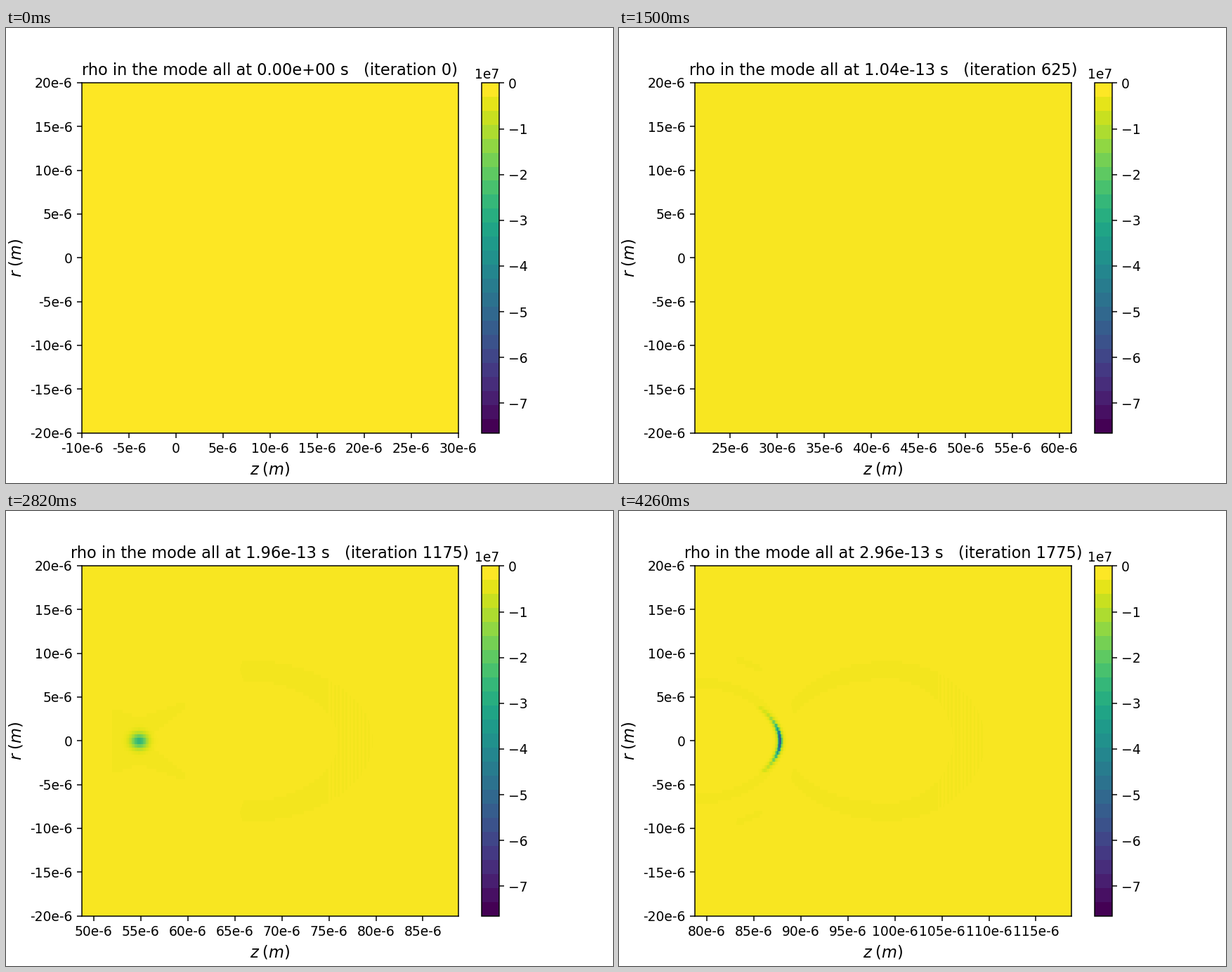
These frames come from a looping animation (864 px wide and 648 px high, 4320 ms). A matplotlib script:

```python
import numpy as np
import matplotlib.pyplot as plt
from matplotlib.animation import FuncAnimation
from matplotlib.cm import ScalarMappable
from matplotlib.colors import Normalize
from matplotlib.ticker import FuncFormatter, MultipleLocator

FRAMES, INTERVAL = 72, 60
STEP = 25                    # iterations per frame
DZ = 0.05                    # window shift per iteration, microns
DT = DZ * 1e-6 / 299792458
VMIN, VMAX = -7.65e7, 0.01e7
ENTRY = 620                  # the laser reaches the plasma
PLASMA, SHEATH = -0.07, -0.12   # units of 1e7

X, R = np.meshgrid(np.arange(0.05, 40, 0.1), np.arange(-19.8, 20, 0.4))
A = np.abs(R)


def inside(xc, left, right, b):
    """Ellipse with different half-lengths on its two sides."""
    a = np.where(X < xc, left, right)
    return ((X - xc) / a) ** 2 + (R / b) ** 2 < 1


def keyed(it, times, values):
    return np.interp(it, times, values)


def wake(it, pinch):
    """Sheath of the leading bubble, striped by the laser at its head."""
    keys = (825, 1175, 1525)
    xc = keyed(it, keys, (20.3, 17.0, 20.5))
    tip = keyed(it, keys, (29.8, 30.9, 30.8))
    tail = keyed(it, (ENTRY, 825, 1175, 1350, 1525), (30, 20.2, 16.8, 12.5, 9))
    half = max(xc - pinch, 1)
    outer = inside(xc, half + 0.4, tip - xc, keyed(it, keys, (8.9, 9.3, 9.1)))
    inner = inside(xc, half - 0.4, keyed(it, keys, (7.5, 10.2, 6.9)),
                   keyed(it, keys, (7.6, 7.0, 7.1)))
    period = 0.8 if it < 1000 else 0.4
    head = keyed(it, keys, (25, 26, 25.6))
    stripes = (X < head) | (np.cos(2 * np.pi * (X - 25.3) / period) > 0.1)
    cut = X > tail + 0.3 * np.abs(A - 8.2)
    return outer & ~inner & stripes & cut


def star(it, pinch):
    """Faint crossing of trajectories behind the first bubble."""
    if not 1060 < it < 1375:
        return np.zeros(X.shape, bool)
    s = keyed(it, (1050, 1175), (0.3, 1))
    dx, r = (X - pinch) / s, A / s
    return (dx > -2.9) & (dx < 4.9) & (r < 2.7 + 0.38 * np.abs(dx)) & (r > 0.85 * dx - 0.4)


def second(it, pinch):
    """Sheath of the trailing bubble, and the streaks outside it."""
    if it < 1250:
        return np.zeros(X.shape, bool)
    xc = keyed(it, (1525, 1775), (-1, 0))
    b = keyed(it, (1525, 1775), (7.4, 6.7))
    a = pinch - xc
    left = keyed(it, (1225, 1500), (8, 0))
    band = inside(xc, 30, a + 0.4, b + 0.55) & ~inside(xc, 30, a - 0.4, b - 0.55)
    streak = (np.abs(A - 8.9 + 0.45 * (X - 5.5)) < 0.35) & (np.abs(X - 5.8) < 1.4)
    return (band & (X > left) & (X < pinch)) | (streak & (it > 1450))


def bunch(it, pinch):
    """Electron spike where the sheath crosses the axis."""
    keys = (1050, 1175, 1350, 1525, 1600, 1775)
    peak = keyed(it, keys, (0, 2.6, 4.2, 6.0, 7.0, 5.2))
    sx = keyed(it, keys, (0.8, 0.6, 0.35, 0.18, 0.15, 0.12))
    sr = keyed(it, keys, (0.7, 0.6, 0.6, 0.65, 0.8, 1.2))
    bend = keyed(it, keys, (0, 0, 0.07, 0.12, 0.13, 0.14))
    halo = keyed(it, keys, (0, 0, 0.4, 0.7, 0.8, 0.9))
    u = X - pinch + bend * R ** 2
    core = peak * np.exp(-0.5 * (u / sx) ** 2 - 0.5 * (R / sr) ** 2)
    arc = halo * np.exp(-0.5 * (u / 0.27) ** 2 - (R / 3.2) ** 2) * (A < 3.8)
    return core + arc


def density(it):
    if it < ENTRY:
        return np.zeros(X.shape)
    pinch = keyed(it, (1050, 1175, 1525, 1775), (5.0, 6.1, 9.1, 9.05))
    faint = wake(it, pinch) | star(it, pinch) | second(it, pinch)
    rho = np.where(faint, SHEATH, PLASMA) - bunch(it, pinch)
    return rho * 1e7


def micron(v, _):
    return f"{v:.0f}e-6" if round(v) else "0"


fig, ax = plt.subplots(figsize=(6.4, 4.8), dpi=135)
norm = Normalize(VMIN, VMAX)
viridis = plt.get_cmap("viridis")
im = ax.imshow(density(0), cmap=viridis, norm=norm, origin="lower",
               aspect="auto", interpolation="nearest", extent=(-10, 30, -20, 20))
fig.colorbar(ScalarMappable(norm, viridis.resampled(25)), ax=ax)
for axis in (ax.xaxis, ax.yaxis):
    axis.set_major_locator(MultipleLocator(5))
    axis.set_major_formatter(FuncFormatter(micron))
ax.set_xlabel(r"$z \;(m)$", fontsize=12)
ax.set_ylabel(r"$r \;(m)$", fontsize=12)
title = ax.set_title("", fontsize=12)


def update(k):
    it = k * STEP
    z = -10 + it * DZ
    im.set_data(density(it))
    im.set_extent((z, z + 40, -20, 20))
    ax.set_xlim(z, z + 40)
    title.set_text(f"rho in the mode all at {it * DT:.2e} s   (iteration {it})")
    return im, title


anim = FuncAnimation(fig, update, frames=FRAMES, interval=INTERVAL,
                     repeat=True, repeat_delay=0, blit=False)
plt.show()
```
